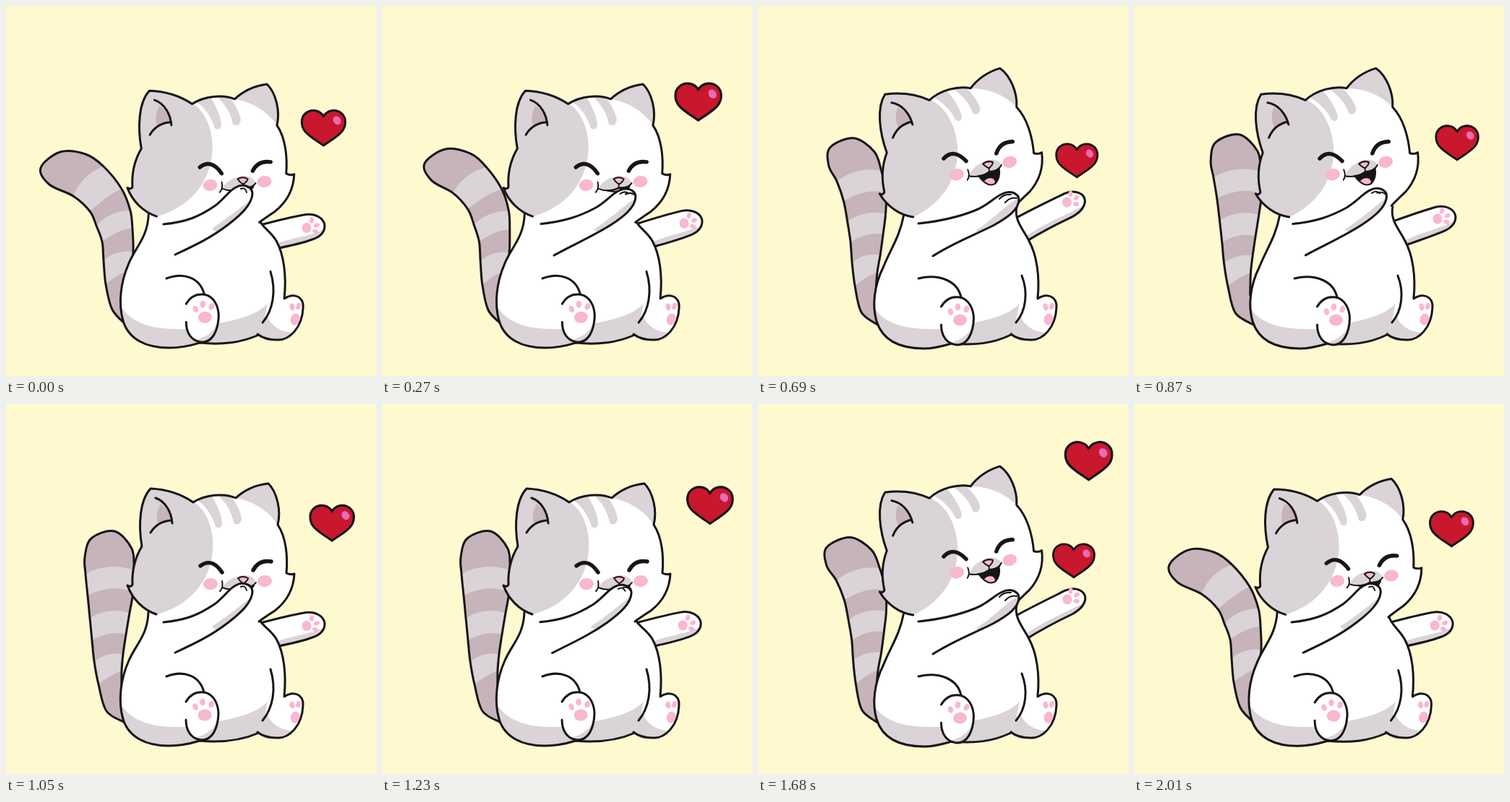
Recreate the animation shown at these times as an HTML page with a canvas. Size 512 by 512 pixels, loop 2040 ms.

```html
<!DOCTYPE html>
<html lang="en">
<head>
<meta charset="utf-8">
<title>Cat blowing kisses</title>
<style>
html, body { margin: 0; width: 100%; height: 100%; overflow: hidden; background: #fff9d0; }
canvas { display: block; width: 100vw; height: 100vh; object-fit: contain; }
</style>
</head>
<body>
<canvas id="stage" width="512" height="512"></canvas>
<script>
const ctx = document.getElementById('stage').getContext('2d');
const LOOP = 2040, BEAT = 1020, STEP = 30;
const INK = '#181517', WHITE = '#fff', GREY = '#dad3d8', MAUVE = '#c6b4ba', PINK = '#f9b7d0';

const mix = (a, b, p) => a + (b - a) * p;
const clamp = v => Math.min(1, Math.max(0, v));
const ease = (t, from, to) => (1 - Math.cos(Math.PI * clamp((t - from) / (to - from)))) / 2;

// Blends the numbers of two path strings that share the same commands.
function morph(a, b, p) {
  const ends = b.match(/-?[\d.]+/g);
  let i = 0;
  return a.replace(/-?[\d.]+/g, v => mix(+v, +ends[i++], p).toFixed(2));
}

function fill(path, color) {
  ctx.fillStyle = color;
  ctx.fill(new Path2D(path));
}

function line(path, width = 3) {
  ctx.strokeStyle = INK;
  ctx.lineWidth = width;
  ctx.stroke(new Path2D(path));
}

function oval(x, y, rx, ry, color, turn = 0) {
  ctx.fillStyle = color;
  ctx.beginPath();
  ctx.ellipse(x, y, rx, ry, turn, 0, 7);
  ctx.fill();
}

function scoped(draw) {
  ctx.save();
  draw();
  ctx.restore();
}

function clipped(path, draw) {
  scoped(() => {
    ctx.clip(new Path2D(path));
    draw();
  });
}

function shaded(path, shade) {
  fill(path, WHITE);
  clipped(path, () => fill(shade, GREY));
  line(path);
}

// Tail outline from the base, up the left side, over the tip and down the right side.
const TAIL_LEFT = [
  [165, 440], [147, 420], [138, 385], [135, 352], [133, 326], [125, 304], [116, 284],
  [93, 263], [60, 247], [48, 224], [75, 202], [110, 205], [135, 222],
  [160, 253], [172, 283], [175, 308], [176, 340], [172, 366], [170, 400]];
const TAIL_UP = [
  [165, 441], [139, 425], [128, 388], [122, 356], [119, 327], [116, 296], [113, 265],
  [110, 235], [109, 212], [118, 186], [150, 176], [174, 200], [177, 230],
  [176, 260], [171, 289], [166, 319], [162, 346], [160, 370], [160, 400]];

function spline(pts) {
  let d = 'M' + pts[0];
  for (let i = 0; i < pts.length - 1; i++) {
    const a = pts[Math.max(0, i - 1)], b = pts[i], c = pts[i + 1];
    const e = pts[Math.min(pts.length - 1, i + 2)];
    d += `C${b.map((v, k) => v + (c[k] - a[k]) / 6)} ${c.map((v, k) => v - (e[k] - b[k]) / 6)} ${c}`;
  }
  return d;
}

function arch(a, b) {
  const dx = b[0] - a[0], dy = b[1] - a[1];
  return `Q${(a[0] + b[0]) / 2 + dy * .22} ${(a[1] + b[1]) / 2 - Math.abs(dx) * .22} ${b}`;
}

function drawTail(p) {
  // Halfway through the swing both sides bow outwards to the right.
  const bow = 28 * p * (1 - p);
  const pts = TAIL_LEFT.map(([x, y], i) => [
    mix(x, TAIL_UP[i][0], p) + bow * Math.abs(Math.sin(i * Math.PI / 9)),
    mix(y, TAIL_UP[i][1], p)]);
  const outline = spline(pts);
  fill(outline, MAUVE);
  clipped(outline, () => {
    for (const i of [7, 5, 3]) {
      const [l1, r1, r2, l2] = [pts[i], pts[19 - i], pts[20 - i], pts[i - 1]];
      fill(`M${l1}${arch(l1, r1)}L${r2}${arch(r2, l2)}Z`, GREY);
    }
  });
  line(outline);
}

function drawFarArm(p) {
  shaded(
    morph('M352 303C375 297 395 292 412 289C427 286 440 293 441 304C441 315 433 320 424 323C408 329 393 332 372 336',
      'M355 294C380 280 405 268 425 258C440 252 453 258 453 269C452 279 444 285 436 290C415 300 395 310 370 326', p),
    morph('M442 308C425 318 400 320 376 328L376 340L440 330Z',
      'M455 272C435 285 405 295 372 317L370 335L450 300Z', p));
  scoped(() => {
    ctx.translate(mix(416, 428, p), mix(307, 270, p));
    ctx.rotate(-.2 * p);
    oval(0, 0, 6.5, 7, PINK);
    oval(7, -10.5, 3, 4.2, PINK, .3);
    oval(14, -3.5, 4.2, 3, PINK, -.4);
    oval(12, 5, 4.2, 3, PINK, .4);
  });
}

function drawBody(h) {
  shaded(
    morph('M197 288C196 320 180 332 170 355C158 382 155 412 162 436C170 462 195 473 225 473C240 473 255 470 268 466C300 469 325 466 350 455L385 404C388 375 385 345 374 325C366 312 356 308 351 299',
      'M202 288C196 320 184 335 174 360C160 388 158 415 164 436C172 462 195 474 230 474C245 474 257 470 268 467C300 470 325 467 350 455L387 404C390 375 386 345 375 325C367 309 354 296 358 278', h),
    'M152 404C172 446 210 447 250 447L290 440C325 433 345 428 362 412L350 470L200 490L150 480Z');

  scoped(() => {
    ctx.translate(2 * h, 0);
    const foot = 'M385 405C398 396 412 402 411 417C410 445 392 463 375 462C363 462 354 459 348 454';
    const whole = foot + 'L354 438L374 398Z';
    fill(whole, WHITE);
    clipped(whole, () => fill('M340 430L361 429Q370 450 396 452L390 470L340 470Z', GREY));
    line(foot);
    oval(396, 416.5, 3.6, 5, PINK, -.2);
    oval(404.5, 415.5, 3.2, 4.8, PINK, .3);
    oval(400, 433.5, 6.2, 8, PINK, .3);
  });
  line(morph('M366 367C374 393 370 420 355 438', 'M365 373C374 396 371 422 357 438', h));
}

function drawNearLeg(h) {
  line(morph('M222 377C245 368 268 375 274 399', 'M222 377C250 370 276 380 281 403', h));
  scoped(() => {
    ctx.translate(4.5 * h, 4 * h);
    const foot = 'M249 412C256 400 266 398 274 399C287 401 294 415 294 429C293 450 285 465 271 465C257 464 249 453 249 437';
    shaded(foot, 'M297 425C292 447 282 456 262 462L275 470L298 460Z');
    oval(262, 419, 3.6, 4.8, PINK, -.35);
    oval(272, 412.5, 3.8, 5, PINK);
    oval(284, 415.5, 3.6, 5, PINK, .4);
    oval(275, 430.5, 9.5, 8, PINK, -.1);
  });
}

function drawFace(h) {
  fill('M300 253Q308 240 328 237Q342 236 346 247Q340 256 328 253Q312 260 300 253Z', GREY);
  oval(283, 249, 10, 8, PINK, -.1);
  oval(358, 245, 10, 8, PINK, -.1);

  const mouth = morph('M312 257Q322 257 328 253Q334 254 343 251Q342 255 335 256Q323 259 312 257Z',
    'M312 256Q322 258 328 253Q334 255 342 251Q342 264 333 271Q321 275 312 256Z', h);
  fill(mouth, INK);
  clipped(mouth, () => oval(325, mix(260, 268, h), 8, 6, PINK, -.15));
  line(mouth, 2);
  line('M299 245Q301 254 296 259M299 254Q314 260 328 253Q340 255 346 247', 2);
  line('M328 247V253', 1.8);

  const nose = 'M321 241Q328 237 335 241Q335 244 329 248Q326 248 321 241Z';
  fill(nose, PINK);
  line(nose, 2);
  line('M269 224Q285 212 299 233', 5.4);
  line('M342 230Q350 215 367 218', 5.4);
}

function drawHead(h) {
  scoped(() => {
    ctx.translate(234 - h, 250 - 3 * h);
    ctx.rotate(-.18 * h);
    ctx.translate(-234, -250);
    const outline = 'M208 291C190 285 175 270 168 251Q173 254 175 250C174 230 179 212 188 197C183 167 185 133 200 117C222 118 243 125 259 136C276 125 302 123 318 130C330 119 345 112 363 110C375 122 381 147 376 167C388 185 390 212 388 234Q394 237 399 235C398 255 390 272 372 286Q355 297 350 301';
    fill(outline, WHITE);
    clipped(outline, () => {
      fill('M150 300V100H258L258 134C282 150 288 180 286 203C283 242 256 280 205 292Z', GREY);
      fill('M318 130L350 90L390 110L376 167C365 150 345 135 318 130Z', GREY);
      fill('M262 131L280 120Q296 143 299 163Q299 175 290 170Q283 145 262 131Z', GREY);
      fill('M291 124L307 122Q324 143 326 159Q324 170 315 165Q312 143 291 124Z', GREY);
    });
    fill('M214 138Q227 147 229 162Q218 161 210 167Q206 151 214 138Z', MAUVE);
    line(outline);
    line('M207 130C221 135 229 150 230 165M200 178Q210 162 229 161');
    scoped(() => {
      ctx.translate(-5 * h, -5 * h);
      drawFace(h);
    });
  });
}

function drawNearArm(p) {
  shaded(
    morph('M218 302C250 299 268 291 290 276C304 265 309 255 318 251C328 245 341 250 341 260C340 275 325 289 308 302C285 320 262 331 234 344',
      'M222 301C250 298 275 293 300 283C318 276 325 266 338 260C350 254 361 260 361 268C361 282 345 293 325 304C295 319 270 328 242 346', p),
    morph('M345 262C330 275 318 285 285 308L300 320L350 285Z',
      'M365 264C345 272 335 288 300 312L330 312L365 290Z', p));
  line(morph('M325 253Q331 250 333 258M332 249Q339 250 340 256',
    'M334 267Q340 260 350 261M342 272Q349 264 358 266', p), 2);
}

function drawHeart(x, y, width) {
  scoped(() => {
    ctx.translate(x, y);
    ctx.scale(width / 62, width / 62);
    const shape = 'M0 -16C5 -25 17 -27 25 -20C32 -14 31 -2 25 5C18 13 8 18 0 24C-8 18 -18 13 -25 5C-31 -2 -32 -14 -25 -20C-17 -27 -5 -25 0 -16Z';
    fill(shape, '#c9172d');
    line(shape);
    oval(18.5, -10.5, 5, 6.2, '#e76bb9', -.6);
  });
}

// Each heart leaves the paw once per loop; age 0 is shortly after it pops up.
function drawHearts(t) {
  const age = born => (t - born + 90 + LOOP) % LOOP - 90;
  const first = age(390), second = age(1410);
  const size = a => mix(59, 67, ease(a, 200, 1150)) * ease(a, -100, -10);
  if (first < 1320) {
    drawHeart(425 + 35 * (1 - Math.exp(-first / 480)), 255 - .1365 * first, size(first));
  }
  if (second < 1320) {
    const drift = 18 * (1 - Math.exp(-second / 230)) - 8 * (second / 1140) ** 2;
    drawHeart(425 + drift, 253 - .1335 * second, size(second));
  }
}

function draw(t) {
  const beat = t % BEAT;
  // The head settles just after the beat restarts.
  const settle = beat < 60 ? beat + BEAT : beat;
  const head = ease(settle, 210, 570) - ease(settle, 870, 1050);
  const far = ease(beat, 180, 510) - ease(beat, 640, 1020);
  const near = ease(beat, 120, 420) - ease(beat, 690, 1020);
  const tail = ease(t, 0, 1050) - ease(t, 1450, LOOP);

  ctx.fillStyle = '#fff9d0';
  ctx.fillRect(0, 0, 512, 512);
  ctx.lineCap = ctx.lineJoin = 'round';
  drawTail(tail);
  drawFarArm(far);
  drawBody(head);
  drawNearLeg(head);
  drawHead(head);
  drawNearArm(near);
  drawHearts(t);
}

const start = performance.now();
function tick() {
  const t = (performance.now() - start) % LOOP;
  draw(Math.floor(t / STEP) * STEP);
  requestAnimationFrame(tick);
}
tick();
</script>
</body>
</html>
```
